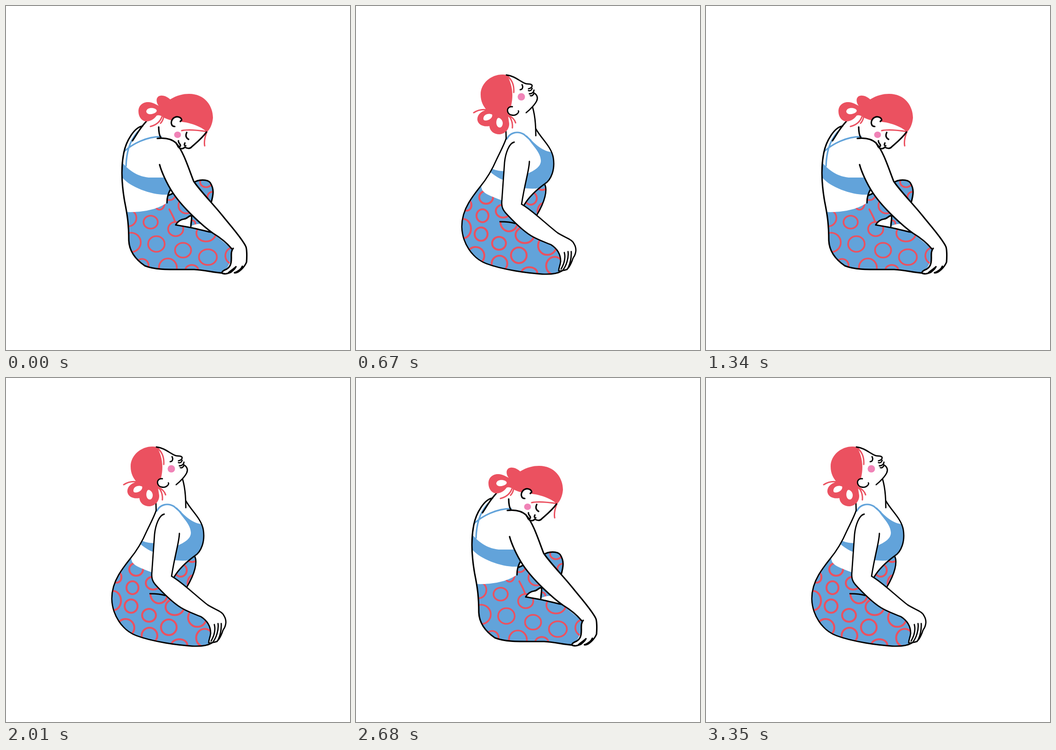
Animation of 748 by 748 pixels, one loop 4020 ms. Source, as an HTML page:

```html
<!DOCTYPE html>
<html lang="en">
<head>
<meta charset="utf-8">
<title>Seated stretch</title>
<style>
html, body { margin: 0; width: 100%; height: 100%; overflow: hidden; background: #fff; }
svg { display: block; width: 100vw; height: 100vh; }
.pose { animation: show 1340ms step-end infinite; }
.arch { animation-name: hide; }
@keyframes show { 0% { visibility: visible } 50%, 100% { visibility: hidden } }
@keyframes hide { 0% { visibility: hidden } 50%, 100% { visibility: visible } }
.ink, .red, .strap, .rings { fill: none; stroke-linecap: round; stroke-linejoin: round; }
.ink { stroke: #000; stroke-width: 3.2; }
.arch .ink { stroke-width: 2.8; }
.red { stroke: #eb5160; stroke-width: 3; }
.strap { stroke: #62a3da; stroke-width: 3.4; }
.rings { stroke: #eb5160; stroke-width: 3.7; }
.arch .rings { stroke-width: 4.2; }
.blue { fill: #62a3da; }
.hair { fill: #eb5160; }
.white { fill: #fff; }
.cheek { fill: #f083b7; }
</style>
</head>
<body>
<svg viewBox="0 0 748 748">
  <defs>
    <path id="legsCurl" d="M261 448C290 449 325 445 350 428L354 411L366 406L450 494L491 528L490 552L475 581C450 579 430 573 409 573C350 573 325 574 302 565C280 550 268 532 267 510C267 475 265 468 261 448Z"/>
    <path id="kneeCurl" d="M408 384C418 377 437 376 444 384C453 398 451 410 446 428L425 410Z"/>
    <path id="legsArch" d="M272 391C274 404 277 408 318 423L331 456C350 476 368 493 385 502C400 510 412 514 424 519C438 528 445 540 445 555L441 578C425 584 418 584 405 583C375 581 320 574 283 560C252 548 231 515 230 480C230 462 235 445 245 428C249 421 254 413 270 393Z"/>
    <path id="kneeArch" d="M410 387C417 400 411 425 393 455L388 462L360 438L366 432C378 412 395 398 410 387Z"/>
    <clipPath id="clipCurl"><use href="#legsCurl"/><use href="#kneeCurl"/></clipPath>
    <clipPath id="clipArch"><use href="#legsArch"/><use href="#kneeArch"/></clipPath>
  </defs>

  <g class="pose curl">
    <use href="#legsCurl" class="blue"/>
    <use href="#kneeCurl" class="blue"/>
    <g class="rings" clip-path="url(#clipCurl)">
      <ellipse cx="314.500" cy="470" rx="15.500" ry="14"/>
      <ellipse cx="327" cy="517.500" rx="18" ry="17"/>
      <ellipse cx="369" cy="485" rx="16.500" ry="15.500"/>
      <ellipse cx="385" cy="531" rx="17.500" ry="16"/>
      <ellipse cx="439" cy="546" rx="19.500" ry="17"/>
      <ellipse cx="266" cy="461" rx="17.500" ry="18"/>
      <ellipse cx="272" cy="514" rx="21" ry="21"/>
      <ellipse cx="296" cy="564" rx="14" ry="14"/>
      <ellipse cx="352" cy="569" rx="19.500" ry="20"/>
      <ellipse cx="404" cy="574" rx="14" ry="11"/>
      <ellipse cx="435" cy="494" rx="21" ry="18"/>
      <ellipse cx="494" cy="543" rx="17" ry="18"/>
      <ellipse cx="334" cy="428" rx="11" ry="15"/>
      <ellipse cx="356" cy="408" rx="13" ry="14"/>
      <ellipse cx="392" cy="434" rx="17" ry="17"/>
      <ellipse cx="435" cy="383" rx="13" ry="11"/>
      <ellipse cx="449" cy="415" rx="11" ry="11"/>
      <path d="M355 442C360 451 365 460 368 470M404 466C409 466 412 470 412 474"/>
    </g>
    <path class="white" d="M369 476C373 469 380 464 388 463C395 462 398 455 403 456L402 478C412 474 420 473 428 474L447 492C435 490 420 484 402 481Z"/>
    <path class="blue" d="M253 341C266 355 282 370 310 373L344 373L359 399L354 410C320 413 270 394 253 373Z"/>
    <path class="strap" d="M257 316C275 300 305 284 337 284M261 348C262 318 268 295 286 274"/>
    <path class="ink" d="M369 476C373 469 380 464 388 463C395 462 398 455 403 456C405 462 402 470 402 479M369 476C385 479 402 481 420 486C435 489 443 492 447 492M408 384C418 377 437 376 444 384C453 398 451 410 446 428M358 398C352 408 350 418 350 428M353 412L366 406"/>
    <path class="ink" d="M305 251C290 267 284 280 275 293M297 261C280 263 261 293 256 320C250 350 251 385 258 425C264 455 267 475 267 510C268 532 280 550 302 565C325 574 350 573 409 573C430 574 450 579 473 581"/>

    <path class="white" d="M334 345C338 360 349 385 362 405C385 440 430 480 450 494L491 528C490 560 487 566 470 580L497 580L523 557L521 522C512 504 490 480 470 455C450 430 422 402 408 381C396 350 386 317 370 298L340 288Z"/>
    <path class="ink" d="M329 288C345 286 360 289 370 298C386 317 396 350 408 381C422 402 450 430 470 455C490 480 512 504 521 522C524 527 524 545 523 557C518 569 505 581 497 580"/>
    <path class="ink" d="M334 345C338 360 349 385 362 405C385 440 430 480 450 494C465 503 480 515 491 528M494 527C489 533 490 540 490 548C490 560 488 567 480 572C473 575 468 578 470 581C474 584 484 581 489 579C494 575 498 572 500 567M483 581C487 576 494 573 500 567M497 580C505 577 511 573 514 566"/>

    <path class="hair" d="M357 203C372 194 385 191 398 191C432 191 450 217 450 243C449 256 444 268 437 274C428 265 412 258 395 254C378 250 355 251 341 241C335 237 331 237 328 238C322 246 314 251 305 251C294 250 288 240 288 229C288 215 299 208 311 209C320 210 326 214 332 217C325 209 326 196 336 195C345 194 352 199 357 203Z"/>
    <path class="white" d="M305 229C306 222 316 220 323 223C328 225 329 228 326 231C320 236 306 238 305 229Z"/>
    <path class="red" d="M314 262C326 259 335 252 339 241M336 255C340 251 342 246 343 240M382 271C395 268 417 270 437 273M437 273C433 283 430 293 432 304"/>
    <path class="white" d="M367 262C359 262 357 252 363 245C370 238 381 241 382 249L380 257Z"/>
    <ellipse class="cheek" cx="373" cy="280" rx="7.500" ry="7"/>
    <path class="ink" d="M367 262C359 262 357 252 363 245C370 238 381 241 382 248L379 251M332 263C332 272 333 281 337 287M436 274C426 288 413 298 404 306C400 311 394 310 389 307M389 298C387 302 388 304 391 304M389 307C385 311 380 311 376 308M375 293C374 299 381 300 379 305L374 306M369 297L374 305M393 275C390 281 391 287 397 290"/>
  </g>

  <g class="pose arch">
    <use href="#legsArch" class="blue"/>
    <use href="#kneeArch" class="blue"/>
    <g class="rings" clip-path="url(#clipArch)">
      <ellipse cx="283" cy="416" rx="15" ry="14"/>
      <ellipse cx="275" cy="456" rx="13" ry="14"/>
      <ellipse cx="272" cy="496" rx="14" ry="14.500"/>
      <ellipse cx="311" cy="516" rx="15" ry="14"/>
      <ellipse cx="354" cy="542" rx="17" ry="17"/>
      <ellipse cx="312" cy="560" rx="17" ry="17"/>
      <ellipse cx="260" cy="543" rx="19" ry="19"/>
      <ellipse cx="233" cy="484" rx="17" ry="21"/>
      <ellipse cx="241" cy="433" rx="10" ry="12"/>
      <ellipse cx="320" cy="446" rx="16" ry="14"/>
      <path d="M314 471C315 483 324 490 333 490C342 489 348 484 350 476"/>
      <ellipse cx="367" cy="498" rx="20" ry="17.500"/>
      <ellipse cx="416" cy="521" rx="20" ry="20"/>
      <ellipse cx="432" cy="565" rx="18.500" ry="19.500"/>
      <ellipse cx="377" cy="580" rx="17" ry="12"/>
      <ellipse cx="380" cy="418" rx="13" ry="14"/>
      <ellipse cx="407" cy="447" rx="12" ry="18"/>
      <ellipse cx="405" cy="390" rx="12" ry="10"/>
    </g>
    <path class="blue" d="M371 281C388 299 402 314 425 318C431 330 432 350 427 364C423 376 412 385 397 396C388 398 376 397 366 396L372 365C390 357 402 349 402 336C401 318 386 306 371 284ZM296 354C305 358 315 359 322 359L320 378C310 375 300 367 293 362Z"/>
    <path class="strap" d="M328 289C335 275 351 271 365 279L380 292"/>
    <path class="ink" d="M313 469C325 469 338 470 346 473M410 387C417 400 411 425 393 455M391 267C404 290 425 306 429 330C433 355 425 378 410 387C395 398 378 412 366 432M384 220C390 240 391 262 391 282"/>
    <path class="ink" d="M326 272L326.500 288C321 304 312 320 306 333C297 354 284 376 270 393C254 413 249 421 245 428C235 445 230 462 230 480C231 515 252 548 283 560C320 574 375 581 405 583C425 584 440 581 448 576"/>

    <path class="white" d="M344 296C333 298 325 320 323 340C321 370 319 400 317 425C316 440 322 447 331 456C350 476 368 493 385 502C400 510 412 514 424 519C438 528 445 540 445 555L441 576L455 574C462 573 468 560 472 548C478 540 481 528 474 517C470 507 455 504 438 493C412 473 382 443 360 431C370 380 377 355 377 338Z"/>
    <path class="ink" d="M344 296C333 298 325 320 323 340C321 370 319 400 317 425C316 440 322 447 331 456C350 476 368 493 385 502C400 510 412 514 424 519C438 528 445 540 445 555C444 566 440 570 441 576"/>
    <path class="ink" d="M377 338C377 355 368 380 360 431C382 443 412 473 438 493C455 504 470 507 474 517C481 528 478 540 472 548C468 560 462 573 455 574C449 575 445 577 441 576M468 534C469 550 464 565 459 573M461 534C463 548 457 565 450 574M453 536C456 548 453 560 446 572"/>

    <path class="hair" d="M328 150C300 144 271 165 271 192C271 208 277 218 284 226C268 230 263 240 264 248C266 260 280 263 290 261C291 272 300 279 312 279C325 278 334 267 333 255C332 246 330 241 332 237L330 226L337 218C344 190 338 166 328 150Z"/>
    <path class="white" d="M277 245C277 236 288 232 296 236C298 242 290 249 282 249C279 249 277 248 277 245ZM308 244C312 241 320 249 319 256C318 264 313 266 309 263C304 259 304 249 308 244Z"/>
    <path class="red" d="M329 152C341 162 344 175 343 188M256 232C265 226 275 224 286 226M331 238C338 244 341 255 340 265M333 238C340 242 345 247 347 254"/>
    <path class="white" d="M340 219C332 218 328 224 330 230C332 238 345 240 351 234L353 227Z"/>
    <circle class="cheek" cx="359.500" cy="197.500" r="8"/>
    <path class="ink" d="M340 219C332 218 328 224 330 230C332 238 345 240 351 234C354 231 354 229 353 228M327 150C345 152 355 163 367 168C373 171 382 168 383 173C383 177 380 179 375 180M383 179C382 183 379 185 375 184M387 183C387 187 383 191 377 191M387 189C394 193 396 200 393 206C390 213 380 224 370 232M379 195C382 196 385 194 387 190M361 171C364 176 362 182 357 182"/>
  </g>
</svg>
</body>
</html>
```
